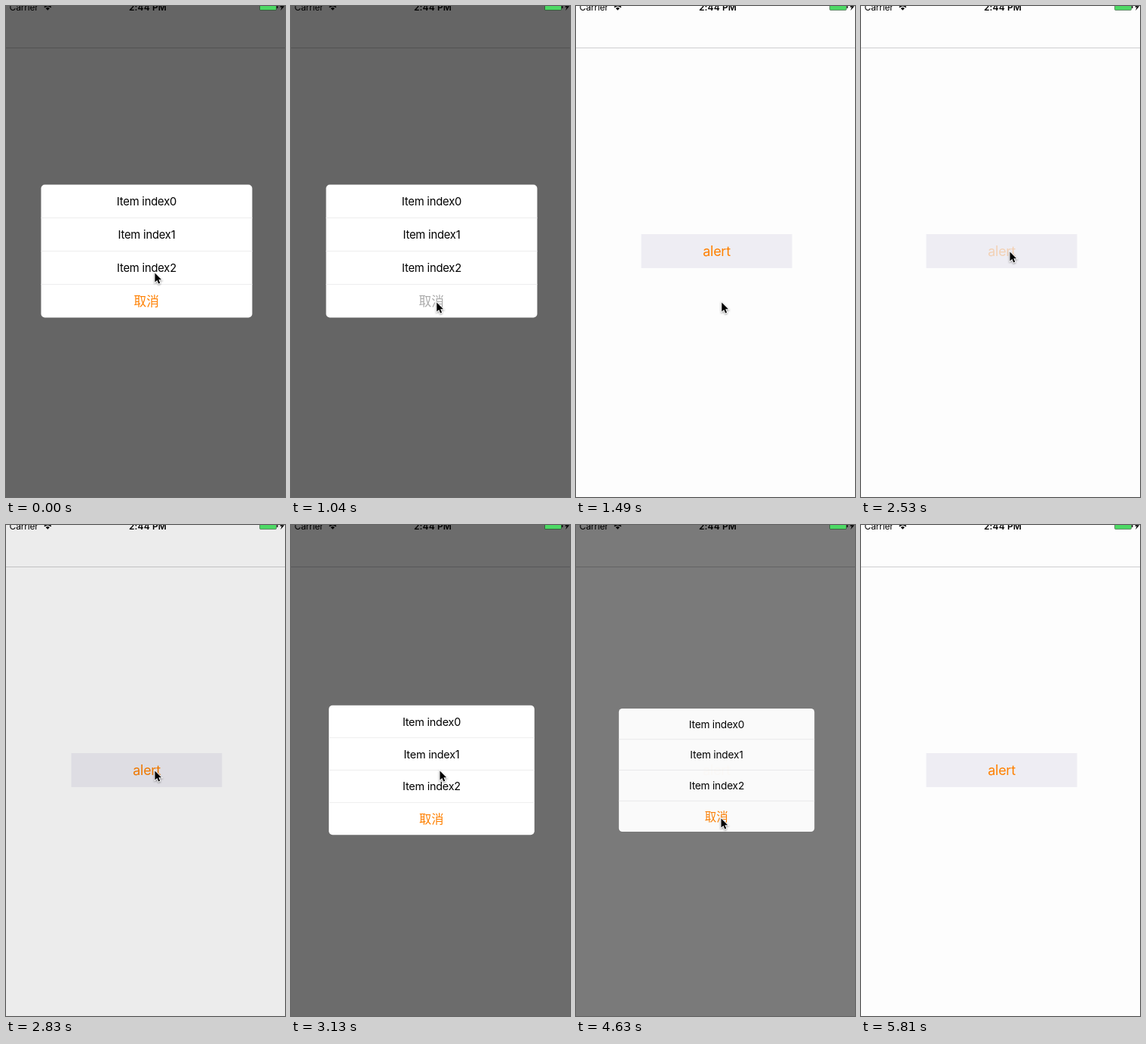
An HTML page that plays this animation: 370 px wide and 650 px high, repeating every 6530 ms.

```html
<!DOCTYPE html>
<html lang="zh-CN">
<head>
<meta charset="utf-8">
<title>Alert</title>
<style>
  html, body { margin: 0; width: 100%; height: 100%; overflow: hidden; background: #fdfdfd; }
  svg { display: block; width: 370px; height: 650px; }
  text { font-family: Inter, Roboto, sans-serif; letter-spacing: -.015em; }
  .mid { text-anchor: middle; }
  .item { font-size: 14.8px; }
  .cancel { font-family: "Noto Sans CJK SC", "Noto Sans CJK", sans-serif; font-size: 16.7px; letter-spacing: 0; }
  .status { font-size: 12px; }
  #cursor { filter: drop-shadow(0 1px 1px rgba(0, 0, 0, .4)); }
</style>
</head>
<body>
<svg viewBox="0 0 370 650">
  <rect width="370" height="650" fill="#fdfdfd"/>
  <rect y="55" width="370" height="1" fill="#cfcfd0"/>
  <rect x="86.5" y="302" width="200" height="45" fill="#eeedf3"/>
  <text id="button" class="mid" x="186.5" y="331" font-size="18" fill="#ff8000">alert</text>
  <rect id="dim" width="370" height="650"/>

  <g class="status">
    <text x="4.6" y="6">Carrier</text>
    <path d="M50.8 1.6Q55.3 -2 59.8 1.6" fill="none" stroke="#000" stroke-width="1.5"/>
    <path d="M52.7 3Q55.3 1.2 57.9 3L55.3 5.7Z"/>
    <text class="mid" x="188" y="6" font-weight="600" style="letter-spacing:.01em">2:44 PM</text>
    <rect x="336.5" y="-4.5" width="22" height="10" rx="1" fill="#4cd964"
          stroke="#000" stroke-width=".8" stroke-opacity=".5"/>
    <rect x="359.2" y="-1" width="1.3" height="4" rx=".6"/>
    <path d="M367 -4L363 1.6H365.6L364.2 6L369.2 .2H366.3Z"/>
  </g>

  <g id="popup">
    <rect x="46.5" y="236.5" width="280" height="176" rx="5" fill="#fff"/>
    <g id="rows"></g>
    <text id="cancel" class="mid cancel" x="186.2" y="396.9">取消</text>
  </g>

  <path id="cursor" d="M1 1.6V13.6L3.9 11L5.8 15.6L7.8 14.8L5.9 10.3H9.7Z"
        stroke="#fff" stroke-width="1.8" paint-order="stroke"/>
</svg>
<script>
const LOOP = 6530;
const STEP = 149;
const $ = id => document.getElementById(id);
const clamp = v => Math.min(1, Math.max(0, v));
const smooth = v => { v = clamp(v); return v * v * (3 - 2 * v); };
const accelerate = v => clamp(v) ** 2;
const between = (t, a, b) => t >= a && t < b;

const home = { x: 196.5, y: 352 };
const moves = [
  { from: 0, to: 590, x: 192.3, y: 391, ease: smooth },
  { from: 1490, to: 2230, x: 196.5, y: 324, ease: smooth },
  { from: 3430, to: 3874, x: 201, y: 371.5, ease: smooth },
  { from: 3874, to: 4180, x: 191.5, y: 387, ease: smooth },
  { from: 5070, to: 5660, x: 338, y: 622, ease: accelerate }
];

$('rows').innerHTML = [0, 1, 2].map(i => {
  const y = 236.5 + 44 * i;
  return `<text class="mid item" x="186.5" y="${y + 27.7}">Item index${i}</text>` +
    `<rect x="46.5" y="${y + 43.5}" width="280" height="1" fill="#ededee"/>`;
}).join('');

function pointer(t) {
  let { x, y } = home;
  for (const m of moves) {
    const u = m.ease((t - m.from) / (m.to - m.from));
    x += (m.x - x) * u;
    y += (m.y - y) * u;
  }
  return { x, y };
}

// 1 while the popup is fully open, 0 while it is closed
function openness(t) {
  const ramp = (from, length) => smooth((t - from) / length);
  return 1 - ramp(1200, 250) + ramp(2739, 450) - ramp(4561, 250);
}

function draw(time) {
  const t = Math.floor((time + 10) / STEP) * STEP;
  const v = openness(t);
  const { x, y } = pointer(t);

  $('dim').setAttribute('opacity', .6 * v);
  $('popup').setAttribute('opacity', clamp((v - .15) / .74));
  $('popup').setAttribute('transform',
    `translate(186.5 324.5) scale(${.46 + .54 * v}) translate(-186.5 -324.5)`);

  const pressed = between(t, 1040, 1200) || between(t, 4470, 4561);
  $('cancel').setAttribute('fill', pressed ? '#aaa' : '#ff8000');
  $('button').setAttribute('opacity', between(t, 2530, 2739) ? .25 : 1);

  $('cursor').setAttribute('transform', `translate(${x} ${y})`);
  $('cursor').setAttribute('visibility', t < 5800 ? 'visible' : 'hidden');
}

const start = performance.now();
function frame() {
  draw((performance.now() - start) % LOOP);
  requestAnimationFrame(frame);
}
frame();
</script>
</body>
</html>
```
